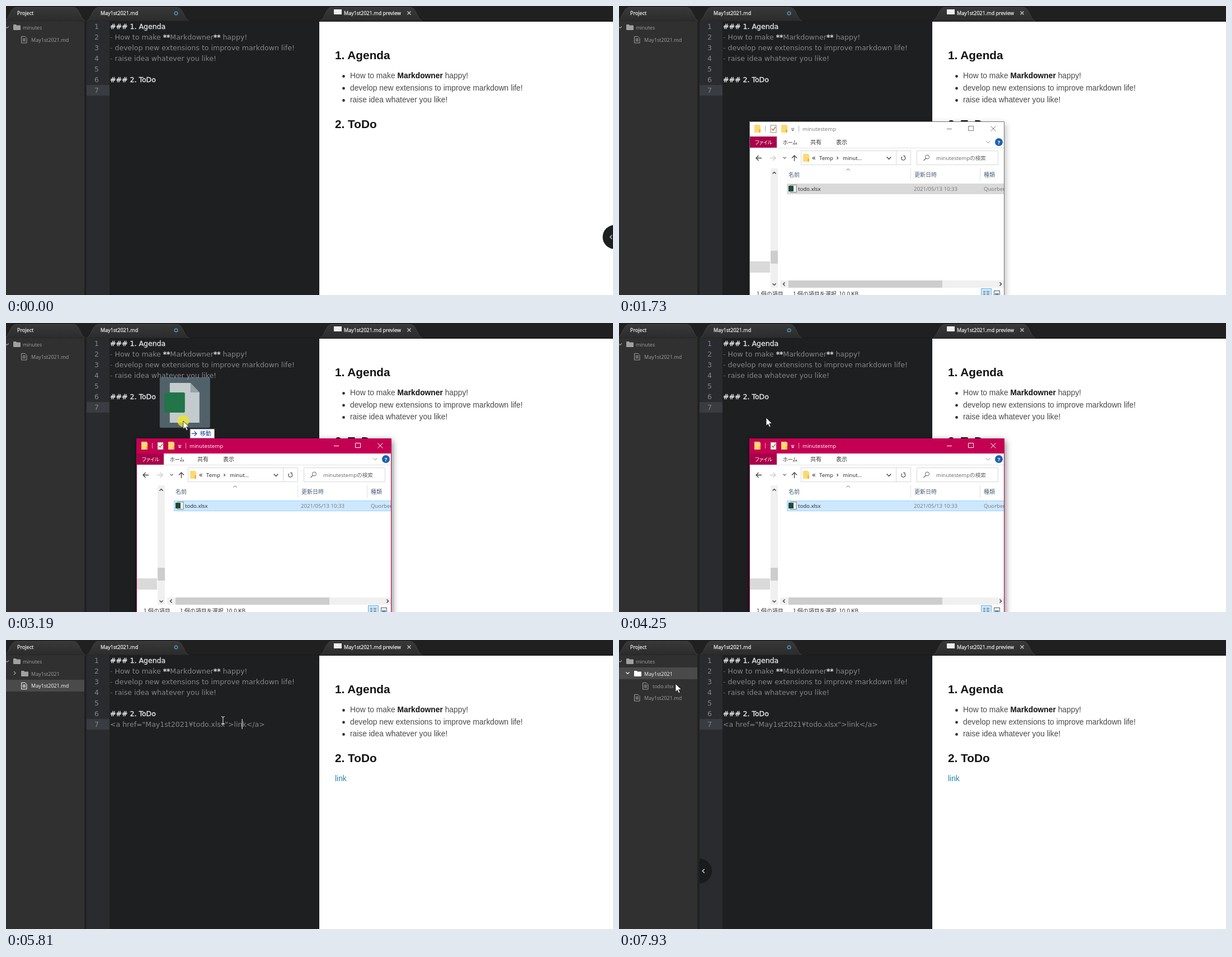
An HTML page that plays this animation: 1085x516 px, repeating every 8 s.

```html
<!DOCTYPE html>
<html lang="en">
<head>
<meta charset="utf-8">
<title>Markdown editor</title>
<style>
html, body { margin: 0; width: 100%; height: 100%; overflow: hidden; background: #1d1f21; }
svg { display: block; width: 100%; height: 100%; }
text { white-space: pre; }
.ui { font: 9px "Open Sans", "Noto Sans", sans-serif; }
.tab { fill: #e8e8e8; stroke: #e8e8e8; stroke-width: .3; }
.code { font: 12.54px "DejaVu Sans", sans-serif; fill: #858688; }
.dash { fill: #5c5e60; }
.strong { fill: #e3e3e3; stroke: #e3e3e3; stroke-width: .35; }
.doc { font: 13.82px "Liberation Sans", Arial, sans-serif; fill: #4a4a4a; }
.head { font: bold 20.8px "Liberation Sans", Arial, sans-serif; fill: #111; }
.win { font: 9.6px "Open Sans", "Noto Sans CJK JP", "Noto Sans CJK", sans-serif; fill: #222; }
.jp { font: 10px "Noto Sans CJK JP", "Noto Sans CJK", sans-serif; fill: #333; }
.kana { font-size: 9px; font-feature-settings: "palt"; }
</style>
</head>
<body>
<svg id="stage" viewBox="0 0 1085 516" preserveAspectRatio="none">
  <defs>
    <linearGradient id="tabFill" x2="0" y2="1"><stop stop-color="#383838"/><stop offset="1" stop-color="#2c2c2c"/></linearGradient>
    <filter id="blur" x="-10%" y="-10%" width="120%" height="120%"><feGaussianBlur stdDeviation="6"/></filter>
    <clipPath id="winClip"><rect x="233" y="206" width="455" height="310"/></clipPath>
    <clipPath id="dockClip"><rect x="144" y="380" width="40" height="60"/></clipPath>
  </defs>
</svg>
<script>
const stage = document.getElementById("stage");
const LOOP = 8000;

const rect = (x, y, w, h, fill, more = "") =>
  `<rect x="${x}" y="${y}" width="${w}" height="${h}" fill="${fill}" ${more}/>`;
const text = (x, y, cls, body, more = "") =>
  `<text x="${x}" y="${y}" class="${cls}" ${more}>${body}</text>`;
const line = (d, color, width = 1, more = "") =>
  `<path d="${d}" fill="none" stroke="${color}" stroke-width="${width}" ${more}/>`;
const shape = (d, fill, more = "") => `<path d="${d}" fill="${fill}" ${more}/>`;
const group = (id, body, more = "") => `<g id="${id}" ${more}>${body}</g>`;

// Chevron centred on x, y, pointing in one of four directions.
function chevron(x, y, dir, size, color, width = 1.2) {
  const turn = { down: 0, left: 90, up: 180, right: 270 }[dir];
  return line(`M${-size} ${-size / 2}L0 ${size / 2}L${size} ${-size / 2}`, color, width,
    `transform="translate(${x} ${y}) rotate(${turn})"`);
}

const folder = (x, y) =>
  shape(`M${x} ${y - 4}q0-1 1-1h4l1 1.5h6q1 0 1 1v6.5q0 1-1 1h-11q-1 0-1-1z`, "currentColor");
const fileIcon = (x, y) =>
  line(`M${x + .5} ${y - 5.5}h6.5l3 3v8.5h-9.5zM${x + 2.5} ${y - 1.5}h5.5m-5.5 2h5.5m-5.5 2h5.5`, "currentColor");
const label = (x, y, body) => text(x, y + 3.5, "ui", body, 'fill="currentColor"');

function tabShape(left, right) {
  return shape(`M${left} 26.5C${left + 9} 25 ${left + 10} 2.5 ${left + 21} 2.5H${right - 21}
    C${right - 10} 2.5 ${right - 9} 25 ${right} 26.5`, "url(#tabFill)", 'stroke="#484848" stroke-width=".8"');
}

function tabs() {
  return rect(0, 0, 1085, 28, "#202020") +
    tabShape(-3, 142) + tabShape(144, 327) + tabShape(561, 744) +
    line("M142 27h5M327 27h234M744 27h341", "#151515") +
    text(20, 15.5, "ui tab", "Project") +
    text(169, 15.5, "ui tab", "May1st2021.md") +
    `<circle cx="304" cy="13" r="2.8" fill="none" stroke="#4a94c4" stroke-width="1.5"/>` +
    rect(586, 6, 14, 9, "#eee") +
    text(604, 15.5, "ui tab", "May1st2021.md preview") +
    line("M717.5 9.5l6 6m0-6l-6 6", "#c8c8c8", 1.3);
}

function tree() {
  return rect(0, 27, 140, 489, "#303030") + rect(140, 27, 4, 489, "#212122") +
    rect(0, 71, 140, 21, "#4a4a4a", 'id="rowMark"') +
    `<g color="#a0a0a0">${chevron(2, 38, "down", 3, "#a0a0a0")}${folder(13, 38)}${label(30, 38, "minutes")}</g>` +
    group("subfolder", group("closedMark", chevron(15.5, 59, "right", 3, "currentColor")) +
      group("openMark", chevron(15.5, 59, "down", 3, "currentColor")) +
      folder(27, 60) + label(45, 60, "May1st2021")) +
    group("moved", fileIcon(42, 82) + label(60, 82, "todo.xlsx"), 'color="#a0a0a0"') +
    group("note", fileIcon(27, 60) + label(45, 60, "May1st2021.md"));
}

const strong = s => `<tspan class="strong">${s}</tspan>`;
const bullet = s => `<tspan class="dash">-</tspan> ${s}`;
const codeLines = [
  strong("### 1. Agenda"),
  bullet(`How to make ${strong("**")}Markdowner${strong("**")} happy!`),
  bullet("develop new extensions to improve markdown life!"),
  bullet("raise idea whatever you like!"),
  "",
  strong("### 2. ToDo"),
];

function editor() {
  const numbers = Array.from({ length: 7 }, (_, i) =>
    text(166, 40.5 + i * 19, "code", i + 1, 'text-anchor="end"')).join("");
  return rect(144, 27, 416, 489, "#1d1f21") + rect(144, 27, 41, 489, "#292b2e") +
    rect(144, 141, 41, 19, "#393c41") + numbers +
    codeLines.map((s, i) => text(186, 40.5 + i * 19, "code", s)).join("") +
    rect(407, 141, 22, 18, "#46484a", 'id="selection"') +
    text(186, 154.5, "code", "&lt;a href=\"May1st2021¥todo.xlsx\"&gt;link&lt;/a&gt;", 'id="anchor"') +
    rect(421.5, 141, 1.2, 18, "#ddd", 'id="caret"');
}

function preview() {
  const items = ['How to make <tspan font-weight="bold" fill="#111">Markdowner</tspan> happy!',
    "develop new extensions to improve markdown life!", "raise idea whatever you like!"];
  return rect(560, 28, 525, 488, "#fff") +
    text(588, 95, "head", "1. Agenda") +
    items.map((s, i) => `<circle cx="603.5" cy="${125.5 + i * 21.5}" r="2.4" fill="#333"/>` +
      text(615, 129 + i * 21.5, "doc", s)).join("") +
    text(588, 218, "head", "2. ToDo") +
    text(588, 252, "doc", "link", 'id="link" style="fill:#2583ad"');
}

const docks =
  group("rightDock", `<circle cx="1088" cy="412.5" r="21.5" fill="#1d1f21"/>` + chevron(1081.5, 412.5, "left", 3.5, "#bbb", 1.6)) +
  group("leftDock", `<circle cx="144" cy="412.5" r="21.5" fill="#1a1b1c" stroke="#111" stroke-width=".6"/>` +
    chevron(151, 412.5, "left", 3.5, "#ccc", 1.6), 'clip-path="url(#dockClip)"');

const yellowFolder = (x, y) =>
  shape(`M${x} ${y}h9l2 2v12h-11z`, "#ffd970") + rect(x + 8, y + 8, 3, 6, "#e9b84a");

function titleBar() {
  return rect(233, 206, 456, 27, "#fff", 'id="titleFill"') +
    yellowFolder(242, 212) + yellowFolder(290, 212) +
    rect(271, 213, 10, 13, "#fff", 'stroke="#888"') + line("M273 219l2.5 3 4-6", "#d3632a", 1.4) +
    group("titleInk",
      line("M261.5 214v10M321.5 214v10", "currentColor", 1, 'opacity=".6"') +
      line("M307.5 218.5h6", "currentColor") + shape("M307.5 220.5h6l-3 3z", "currentColor") +
      text(328, 223, "win", "minutestemp", 'style="fill:currentColor"') +
      line("M586 219.5h9M624.5 214.5h9v8h-9zM664.5 214.5l9 9m0-9l-9 9", "currentColor"));
}

function ribbon() {
  return rect(233, 233, 49, 20, "#a90049") +
    text(243, 246.5, "jp kana", "ファイル", 'style="fill:#fff"') +
    text(293, 246.5, "jp kana", "ホーム") + text(342, 246.5, "jp", "共有") + text(388, 246.5, "jp", "表示") +
    chevron(660, 243, "down", 3.5, "#888", 1) +
    `<circle cx="679" cy="243" r="7" fill="#1d62ad"/>` +
    text(679, 246.8, "win", "?", 'text-anchor="middle" style="fill:#fff;font-weight:bold"') +
    line("M282 253.5h407", "#e2e2e2");
}

function addressRow() {
  return line("M255 271.5h-10m4.5-4.5l-4.5 4.5 4.5 4.5", "#444", 1.3) +
    line("M270 271.5h10m-4.5-4.5l4.5 4.5-4.5 4.5", "#ccc", 1.3) +
    chevron(296, 271, "down", 2.5, "#666") +
    line("M313.5 277v-10m-4.5 4.5l4.5-4.5 4.5 4.5", "#444", 1.3) +
    rect(325.5, 258.5, 196, 25, "#fff", 'stroke="#d9d9d9"') + line("M495.5 259v24", "#d9d9d9") +
    yellowFolder(329, 264) + text(345, 274.5, "win", "«", 'style="font-size:13px"') +
    text(358, 275, "win", "Temp") + chevron(390.5, 271.5, "right", 2.2, "#444") +
    text(400, 275, "win", "minut...") + chevron(482.5, 271.5, "down", 3.8, "#444", 1.4) +
    line("M506 269a3.5 3.5 0 1 0 4.5 0M508 267.5h3v3", "#444", 1.1) +
    rect(532.5, 258.5, 145, 25, "#fff", 'stroke="#d9d9d9"') +
    `<circle cx="551" cy="269.5" r="3.5" fill="none" stroke="#666"/>` + line("M548.5 272l-4 4", "#666", 1.2) +
    text(567, 275, "win", "minutestempの検索", 'style="fill:#666"');
}

function fileList() {
  const heading = (x, s) => text(x, 304.5, "jp", s, 'style="fill:#4c607a"');
  return rect(233, 456, 37, 20, "#d9d9d9") +
    rect(271, 290, 13, 213, "#f0f0f0") + rect(271, 437, 13, 23, "#cdcdcd") +
    chevron(277.5, 298, "up", 3, "#444", 1.5) + chevron(277.5, 497, "down", 3, "#444", 1.5) +
    chevron(409.5, 292, "up", 3, "#666", 1) +
    heading(303, "名前") + heading(528, "更新日時") + heading(652, "種類") +
    line("M521.5 290v22M645.5 290v22", "#e0e0e0") +
    rect(300.5, 317.5, 400, 18, "#d9d9d9", 'id="fileRow"') +
    rect(307, 319.5, 10, 13, "#fff", 'stroke="#777"') + rect(303, 321, 9, 10, "#1d4a39") +
    text(320, 330, "win", "todo.xlsx") +
    text(527, 330, "win", "2021/05/13 10:33", 'style="fill:#777"') +
    text(652, 330, "win", "Quorben", 'style="fill:#777"') +
    rect(288, 490, 401, 13, "#f0f0f0") + rect(303, 490, 275, 13, "#cdcdcd") +
    chevron(295, 496.5, "left", 3, "#444", 1.5) + chevron(682, 496.5, "right", 3, "#444", 1.5) +
    text(246, 517.5, "jp", "1 個の項目") + text(311, 517.5, "jp", "1 個の項目を選択  10.0 KB") +
    rect(647.5, 504.5, 18, 18, "#cce8ff", 'stroke="#6bb2e6"') +
    line("M651 509.5h4m2 0h5M651 512.5h4m2 0h5M651 515.5h4m2 0h5", "#456") +
    rect(670.5, 508.5, 10, 9, "#fff", 'stroke="#555"') + rect(672, 513, 7, 3, "#4a90c8");
}

function explorer() {
  return group("explorer",
    rect(235, 210, 456, 330, "#000", 'id="shadow" filter="url(#blur)"') +
    `<g clip-path="url(#winClip)">${rect(233, 206, 456, 310, "#fff")}${titleBar()}${ribbon()}${addressRow()}${fileList()}</g>` +
    line("M233.5 516V206.5H688.5V516", "#777", 1, 'id="frame"'));
}

function pointer() {
  const dragged =
    rect(-42, -78, 90, 90, "#7c98a6", 'rx="2" opacity=".55"') +
    shape("M-24-68h37l16 17v54h-53z", "#c3cbcd") + shape("M13-68v17h16z", "#98a3a7") +
    rect(-34, -51, 37, 36, "#217548", 'rx="2"');
  const hint = rect(12.5, 14.5, 43, 16, "#fff", 'stroke="#a9a9b5"') +
    line("M15 22.5h9m-4-4l4 4-4 4", "#2447a0", 1.3) + text(30, 26, "jp", "移動", 'style="fill:#2447a0"');
  return group("pointer",
    group("dragged", dragged) +
    `<circle id="press" r="10.5" fill="#eee32a" opacity=".8"/>` +
    group("hint", hint) +
    shape("M0 0v14.5l3.4-3 2.4 5.3 2.4-1-2.4-5.2h4.7z", "#fff", 'id="arrow" stroke="#111" stroke-width=".8"') +
    line("M-3-6.5q3 0 3 2V5q0 2-3 2M3-6.5q-3 0-3 2V5q0 2 3 2", "#ddd", 1.1, 'id="beam"'));
}

stage.insertAdjacentHTML("beforeend",
  tabs() + tree() + editor() + preview() + docks + explorer() + pointer());

const el = id => document.getElementById(id);
const show = (id, on) => el(id).setAttribute("display", on ? "inline" : "none");
const paint = (id, name, value) => el(id).setAttribute(name, value);
const clamp = v => Math.max(0, Math.min(1, v));

// Pointer stops: time, x, y.
const route = [
  [1800, 430, 500], [2420, 344, 320], [2560, 344, 320], [2800, 336, 270], [3050, 325, 195],
  [3190, 317, 175], [3320, 287, 166], [3390, 263, 168], [4250, 263, 169], [4720, 263, 169],
  [5350, 423, 152], [5740, 423, 152], [6490, 52, 60], [6620, 47, 58], [6800, 44, 61],
  [7320, 44, 61], [7600, 72, 100], [7790, 90, 94], [7930, 101, 78],
];

function along(t) {
  const next = route.findIndex(stop => stop[0] > t);
  if (next < 0) return route[route.length - 1].slice(1);
  if (next === 0) return route[0].slice(1);
  const [t0, x0, y0] = route[next - 1], [t1, x1, y1] = route[next];
  const k = (t - t0) / (t1 - t0);
  return [x0 + (x1 - x0) * k, y0 + (y1 - y0) * k];
}

function drawTree(t) {
  const created = t >= 4320, opened = t >= 7040, marked = t >= 5740;
  show("subfolder", created);
  show("closedMark", !opened);
  show("openMark", opened);
  show("moved", opened);
  show("rowMark", marked);
  paint("rowMark", "y", opened ? 49 : 71);
  paint("subfolder", "color", opened ? "#fff" : "#a0a0a0");
  paint("note", "color", marked && !opened ? "#fff" : "#a0a0a0");
  paint("note", "transform", `translate(0 ${opened ? 43 : created ? 21.7 : 0})`);
}

function drawExplorer(t) {
  const active = t >= 2450;
  show("explorer", t >= 1730 && t < 5740);
  paint("shadow", "opacity", active ? .5 : .28);
  paint("titleFill", "fill", active ? "#c40052" : "#fff");
  paint("titleInk", "color", active ? "#fff" : "#777");
  paint("frame", "stroke", active ? "#c40052" : "#777");
  paint("fileRow", "fill", active ? "#cce8ff" : "#d9d9d9");
  paint("fileRow", "stroke", active ? "#99d1ff" : "#d9d9d9");
}

function drawPointer(t) {
  const [x, y] = along(t);
  const dragging = t >= 2560 && t < 4250;
  const overCode = x > 186 && x < 560 && t >= 4790 && t < 6490;
  show("pointer", t >= 1800);
  paint("pointer", "transform", `translate(${x} ${y})`);
  show("dragged", dragging);
  show("hint", dragging);
  show("press", (t >= 2450 && t < 4250) || (t >= 6960 && t < 7100));
  show("arrow", !overCode);
  show("beam", overCode);
}

function draw(t) {
  drawTree(t);
  drawExplorer(t);
  drawPointer(t);
  show("anchor", t >= 4600);
  show("link", t >= 4600);
  show("selection", t >= 4600 && t < 5740);
  show("caret", t >= 5740 && t < 6900);
  paint("rightDock", "opacity", 1 - clamp((t - 1190) / 280));
  show("leftDock", t >= 6560);
}

function tick() {
  draw(performance.now() % LOOP);
  requestAnimationFrame(tick);
}
tick();
</script>
</body>
</html>
```
